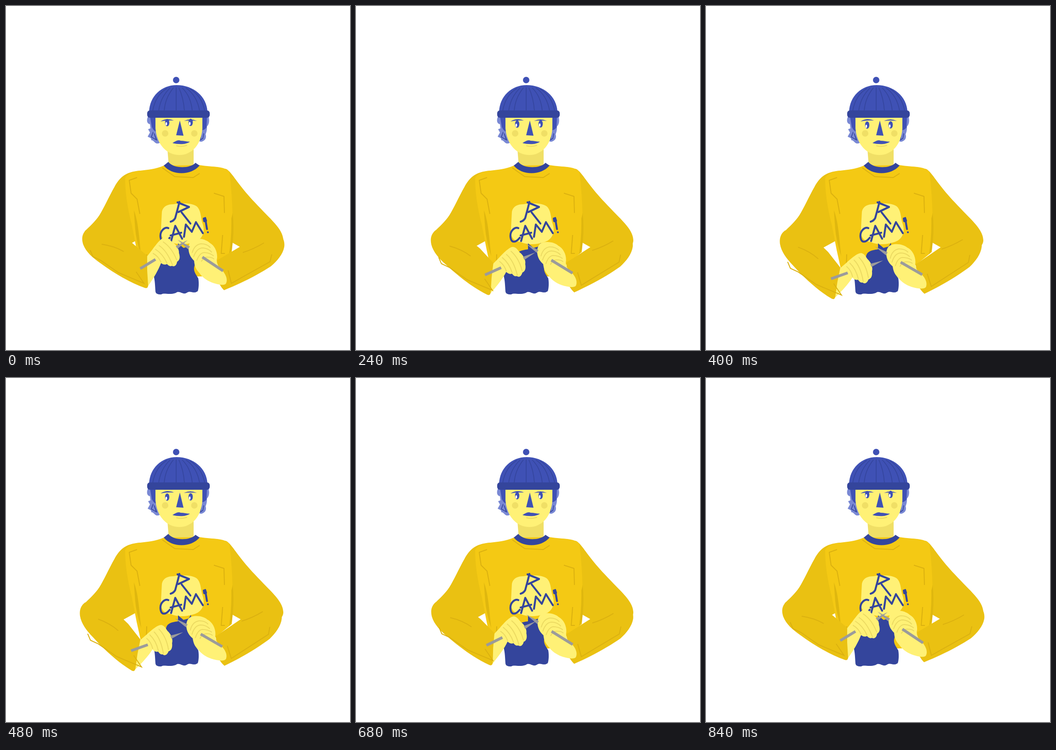
These frames come from a looping animation (748 px wide and 748 px high, 880 ms). An HTML page:

```html
<!DOCTYPE html>
<html lang="en">
<head>
<meta charset="utf-8">
<title>Knitting</title>
<style>
  html, body { margin: 0; width: 100%; height: 100%; overflow: hidden; background: #fff; }
  svg { display: block; width: 100vw; height: 100vh; }
  .skin { fill: #fff176; }
  .shade { fill: #f0df66; }
  .body { fill: #f4c914; }
  .sleeve { fill: #eac112; }
  .fold { fill: #dfb70f; }
  .blue { fill: #3f51b5; }
  .navy { fill: #34459c; }
  .lilac { fill: #7988d4; }
  .metal { fill: #9b9b9b; }
  .line { fill: none; stroke: #dbb110; stroke-width: 2; }
  .finger { fill: none; stroke: #ebda62; stroke-width: 2; stroke-linecap: round; }
  .rib { fill: none; stroke: #34459c; stroke-width: 1.6; }
  .ink { fill: none; stroke: #34459c; stroke-width: 4.2; stroke-linecap: round; stroke-linejoin: round; }
  .rod { fill: none; stroke: #9b9b9b; stroke-width: 6; }
</style>
</head>
<body>
<svg viewBox="0 0 748 748">
  <!-- head -->
  <path class="lilac" d="M309 240C305 248 306 256 313 257L314 266L309 268L313 275L308 284C313 287 316 286 316 292C321 291 323 299 329 299Q335 299 336 294L330 262V240Z"/>
  <path class="lilac" d="M422 240H440C443 248 442 257 437 262C437 270 436 274 434 279C436 285 434 290 431 292Q426 297 420 294Z"/>
  <path class="blue" d="M313 240H330V274Q322 274 317 263ZM422 240H437L436 264Q431 271 424 270Z"/>
  <path class="rib" d="M320 274L316 285L327 291L322 277L328 292M424 279L423 291L428 288L430 277"/>
  <path class="shade" d="M351 312L354 348Q382 360 408 346V312Z"/>
  <path class="skin" d="M325 240H427V266C425 301 404 324 377 324C350 324 328 302 325 266Z"/>
  <g class="shade"><circle cx="346" cy="277" r="7"/><circle cx="409.500" cy="277" r="7"/></g>
  <g id="eyes">
    <g class="blue"><ellipse cx="350.500" cy="253.500" rx="4.700" ry="8"/><ellipse cx="401.500" cy="253" rx="4.700" ry="8"/></g>
    <g fill="#fff"><ellipse cx="348.500" cy="256" rx="1.800" ry="3.500"/><ellipse cx="399.500" cy="255.500" rx="1.800" ry="3.500"/></g>
  </g>
  <path class="blue" d="M336 251Q350 242 365 249Q350 248 336 251ZM387 250Q401 243 415 250Q401 248 387 250ZM378 249L386 282L370 281Z"/>
  <path class="blue" d="M362 298C368 294 374 290 380 293C387 293 393 295 400 295C391 302 374 301 362 298Z"/>
  <path class="finger" d="M371 304Q382 307 393 303"/>
  <circle class="blue" cx="370" cy="161" r="7"/>
  <path class="blue" d="M311 231C312 196 338 172 371 172C407 172 437 196 438 231Z"/>
  <path class="rib" d="M350 179Q325 194 319 228M357 178Q336 198 332 228M364 178Q346 200 344 228M370 177V228M376 178Q386 200 388 228M383 178Q402 196 405 228M391 178Q415 194 421 228M400 180Q426 196 432 228"/>
  <rect class="navy" x="307" y="227" width="136" height="16" rx="6"/>

  <!-- sweater -->
  <path class="sleeve" d="M292 358C262 360 248 371 236 393C223 416 213 439 203 455C193 470 180 481 171 490L185 522L225 535L254 526L285 509Z"/>
  <path class="sleeve" d="M478 354C492 361 500 384 541 427C575 464 602 484 603 509C604 530 566 542 540 538L509 524L470 502V356Z"/>
  <path class="body" d="M343 347C325 355 308 356 292 358C275 360 264 365 259 374C259 405 264 440 274 478L284 530L294 575L410 588H426L460 560L491 535C495 478 492 410 486 362C478 347 450 351 421 346Z"/>
  <path class="fold" d="M278 444C288 470 289 500 294 544Q283 510 281 485ZM493 450Q497 490 491 530L485 540Q491 500 490 462Z"/>
  <path class="navy" d="M343 347L353 339C364 354 400 354 412 341L421 347C402 369 361 369 343 347Z"/>
  <path class="line" d="M285 373L268 379L272 407L285 420L291 452M340 352L367 371L407 373L421 364M452 407L474 414L475 450M471 498L468 538H476M306 540L305 572"/>

  <!-- emblem -->
  <path class="skin" d="M339 447C342 435 351 431 365 431C385 427 410 429 417 438C425 448 423 462 428 475C433 491 428 509 407 514C390 520 370 519 358 513C343 512 335 502 337 484Z"/>
  <g class="ink">
    <path d="M377 426C374 440 371 449 368 461Q365 467 358 469M373 427L398 437L375 448M382 449L401 473"/>
    <path d="M353 483C346 480 334 488 336 503C338 516 347 515 356 504M359 511L368 478L383 506M358 499L381 493"/>
    <path d="M387 502L391 475L404 491L413 470L428 494M430 462L431 468L435 467L433 461L437 485M439 492V492"/>
  </g>

  <!-- knitting -->
  <path class="navy" d="M348 545C350 533 360 531 374 529L374 516L386 526L397 523L402 515L404 530C408 545 411 552 411 562C405 575 413 583 418 592C420 602 419 615 417 620C408 627 402 618 394 623C384 630 378 617 369 624C354 629 344 623 338 627Q326 628 325 621C324 607 324 597 321 586Q330 572 339 556Z"/>

  <!-- right arm -->
  <g id="right">
    <path class="sleeve" d="M565 463C592 485 608 504 605 524C602 540 590 554 576 566C550 583 516 601 474 618Q467 611 463 602L459 553L513 521L545 500Z"/>
    <path class="line" d="M578 540L574 556L490 603L483 575"/>
    <path class="skin" d="M397 530C396 518 402 508 410 507C423 504 437 509 443 515C454 521 460 535 459 548C456 559 463 570 472 577C480 587 482 597 478 604C473 609 458 605 447 601C435 596 426 589 420 580C412 571 410 565 409 554C404 549 398 542 397 530Z"/>
    <path class="finger" d="M405 536Q410 519 424 517Q437 517 444 525M408 545Q415 526 428 526Q440 527 447 535M415 553Q421 537 431 536Q444 537 451 543M425 555Q431 545 439 546Q447 546 452 550"/>
    <path class="rod" d="M427 546L472 576"/>
    <path class="metal" d="M373 508L400 523L396 529Z"/>
  </g>
  <path id="crease" class="line" d="M515 536Q540 528 561 515"/>

  <!-- left arm -->
  <g id="left">
    <path class="skin" d="M304 548L318 530C326 519 338 503 346 503C352 503 357 509 361 513C370 518 377 529 376 537C379 546 378 553 372 556C371 564 366 568 361 565C356 567 353 564 350 561C345 564 340 561 337 559C331 575 322 590 309 609L304 600Z"/>
    <path class="finger" d="M342 513Q361 526 371 552M333 521Q350 532 362 563M325 529Q341 539 350 559M320 538Q331 544 337 557"/>
    <path class="sleeve" d="M173 488C165 497 164 507 168 519C174 535 189 548 205 559C235 581 270 602 302 613Q309 615 309 607L307 575L307 543L274 515L245 497Z"/>
    <path class="line" d="M208 518Q236 522 256 534"/>
    <path class="rod" d="M292 571L325 551"/>
    <path class="metal" d="M395 509L373 528L369 522Z"/>
  </g>
  <path id="seam" class="line" d="M183 531L189 545L206 553L245 580L300 603L283 578"/>
</svg>
<script>
  const LOOP = 880, STEP = 40, PEAK = 440, END = 840;
  const place = (id, value) => document.getElementById(id).setAttribute('transform', value);

  // 0 at the crossed needles, 1 with the left arm fully lowered
  function reach(time) {
    const t = Math.floor(time % LOOP / STEP) * STEP;
    return t < PEAK ? t / PEAK : (END - t) / (END - PEAK);
  }

  function draw() {
    const p = reach(performance.now());
    place('left', `rotate(${12.8 * p} 173 483)`);
    place('right', `rotate(${-4.1 * p} 595 608)`);
    place('seam', `translate(${-6 * p} ${28 * p})`);
    place('crease', `translate(${-3 * p} ${-8 * p})`);
    place('eyes', `translate(0 ${6 * p})`);
    requestAnimationFrame(draw);
  }
  draw();
</script>
</body>
</html>
```
